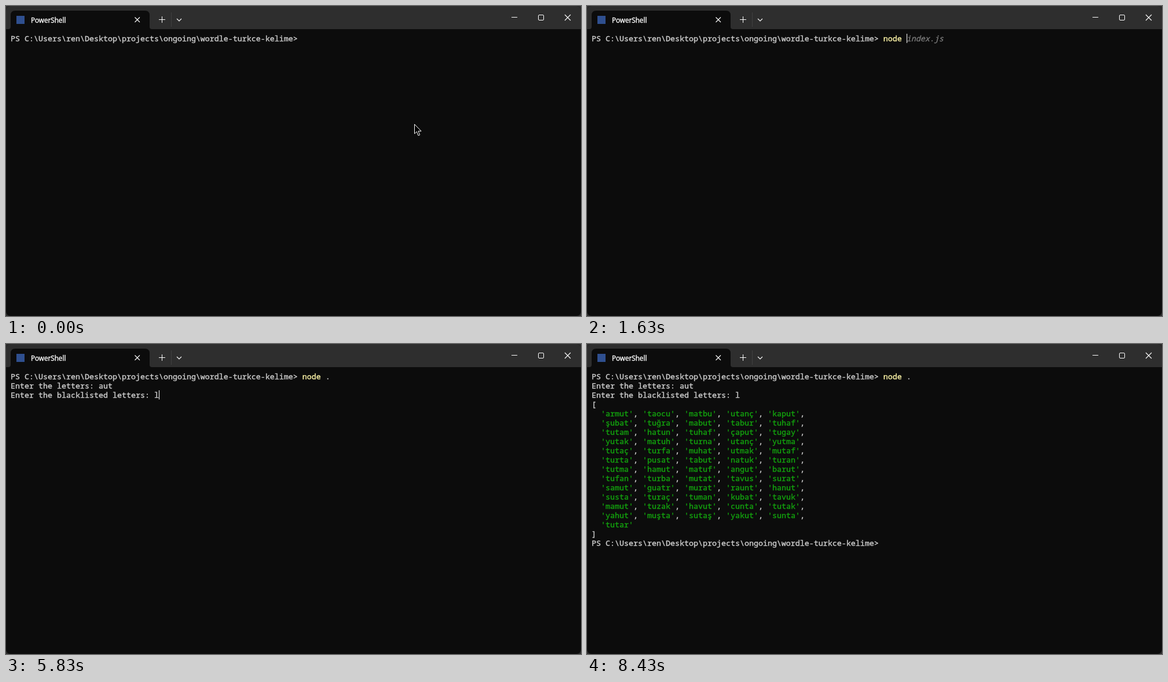
Recreate the animation shown at these times as an HTML page. Size 993 by 536 pixels, loop 8500 ms.

```html
<!DOCTYPE html>
<html lang="en">
<head>
<meta charset="utf-8">
<title>Terminal</title>
<style>
  html, body { margin: 0; width: 100%; height: 100%; overflow: hidden; background: #2b2b2b; }
  #win { position: absolute; left: 0; top: 0; width: 993px; height: 536px; overflow: hidden; border-radius: 8px; background: #0c0c0c; }
  svg { position: absolute; left: 0; top: 0; }
  #title, #term { -webkit-text-stroke: .4px currentColor; white-space: pre; }
  #title { position: absolute; left: 43px; top: 15px; font: 11.7px/18px "Open Sans", "Noto Sans", sans-serif; color: #fff; }
  #term { position: absolute; left: 8px; top: 48px; margin: 0; font: 13.3333px/16px "Noto Sans Mono", "DejaVu Sans Mono", monospace; font-variant-ligatures: none; color: #ccc; }
  .cmd { color: #f9f1a5; }
  .hint { color: #797979; font-style: italic; }
  .str { color: #13a10e; }
  #caret { position: absolute; left: 0; top: 0; width: 1px; height: 16px; background: #fff; }
</style>
</head>
<body>
<div id="win">
  <svg width="993" height="40" fill="none" stroke="#fff">
    <rect width="993" height="40" fill="#2e2e2e" stroke="none"/>
    <path d="M4 40Q8 40 8 36V16Q8 8 16 8H240Q248 8 248 16V36Q248 40 252 40Z" fill="#0c0c0c" stroke="none"/>
    <rect x="18" y="17" width="14" height="14" fill="#2f4f8f" stroke="none"/>
    <path d="M222.5 19.5l8.5 8.5m0-8.5l-8.5 8.5" stroke-width="1.1"/>
    <path d="M264 23.5h11M269.5 18v11"/>
    <path d="M285.5 11v25" stroke="#414141"/>
    <path d="M295 22l4 4 4-4" stroke-width="1.1"/>
    <path d="M873 19.5h10"/>
    <rect x="919.5" y="15.5" width="9" height="9" rx="1.5"/>
    <path d="M965 15l10 10m0-10l-10 10" stroke-width="1.1"/>
  </svg>
  <div id="title">PowerShell</div>
  <pre id="term"></pre>
  <div id="caret"></div>
  <svg id="mouse" width="14" height="22">
    <path d="M.5 .5V16.8L4.3 13.2 7 20 9.6 18.9 6.9 12.3H12Z" fill="#000" stroke="#fff" stroke-linejoin="round"/>
  </svg>
</div>
<script>
const LOOP = 8500, FRAME = 100 / 3;
const $ = id => document.getElementById(id);
const term = $('term'), caret = $('caret'), mouse = $('mouse');

const prompt = 'PS C:\\Users\\ren\\Desktop\\projects\\ongoing\\wordle-turkce-kelime> ';
const words = `armut taocu matbu utanç kaput şubat tuğra mabut tabur tuhaf
tutam hatun tuhaf çaput tugay yutak matuh turna utanç yutma
tutaç turfa muhat utmak mutaf turta pusat tabut natuk turan
tutma hamut matuf angut barut tufan turba mutat tavus surat
samut guatr murat raunt hanut susta turaç tuman kubat tavuk
mamut tuzak havut cunta tutak yahut muşta sutaş yakut sunta tutar`.split(/\s+/);

// key press times for each input
const command = { text: 'node .', at: [1330, 1400, 1470, 1570, 1630, 1700] };
const letters = { text: 'aut', at: [3270, 3430, 3570] };
const blocked = { text: 'l', at: [5830] };
const hint = 'node index.js';

const caretOn = [[600, 1130], [1330, 2400], [2930, 4800], [5330, 6700], [7230, 7765], [8300, 8430]];

// pointer tracks: time, x, y
const tracks = [
  { from: 0, to: 1330, keys: [[0, 705, 204], [100, 705, 204], [230, 702, 178], [360, 694, 108], [480, 687, 52], [600, 684, 28], [633, 686, 26], [730, 708, 66], [830, 727, 109]] },
  { from: 1930, to: 3270, keys: [[1930, 727, 109]] },
  { from: 7700, to: 7900, keys: [[7700, 728, 114], [7766, 744, 206], [7867, 787, 487]] }
];

const typed = (input, t) => input.text.slice(0, input.at.filter(a => t >= a).length);
const span = (cls, s) => `<span class="${cls}">${s}</span>`;

function listing() {
  const rows = ['['];
  for (let i = 0; i < words.length; i += 5) {
    const row = words.slice(i, i + 5).map(w => span('str', `'${w}'`)).join(', ');
    rows.push('  ' + row + (i + 5 < words.length ? ',' : ''));
  }
  return [...rows, ']'];
}

// returns the lines on screen and the caret cell
function screen(t) {
  const cmd = typed(command, t);
  let col = prompt.length + cmd.length;
  let first = prompt + span('cmd', cmd.slice(0, 4)) + cmd.slice(4);
  if (cmd && hint.startsWith(cmd)) first += span('hint', hint.slice(cmd.length));
  const lines = [first];
  const ask = (label, input) => {
    const s = label + typed(input, t);
    lines.push(s);
    col = s.length;
  };
  if (t >= 1830) { lines.push(''); col = 0; }
  if (t >= 1930) { lines.pop(); ask('Enter the letters: ', letters); }
  if (t >= 4200) ask('Enter the blacklisted letters: ', blocked);
  if (t >= 6070) { lines.push(''); col = 0; }
  if (t >= 6100) {
    lines.pop();
    lines.push(...listing(), prompt);
    col = prompt.length;
  }
  return { html: lines.join('\n'), col, row: lines.length - 1 };
}

function pointerAt(keys, t) {
  const i = keys.findIndex(k => k[0] > t);
  if (i < 0) return keys[keys.length - 1].slice(1);
  const a = keys[i - 1], b = keys[i], p = (t - a[0]) / (b[0] - a[0]);
  return [1, 2].map(n => Math.round(a[n] + (b[n] - a[n]) * p));
}

let shown;
function draw(t) {
  const s = screen(t);
  if (s.html !== shown) term.innerHTML = shown = s.html;
  caret.style.transform = `translate(${8 + s.col * 8}px, ${48 + s.row * 16}px)`;
  caret.style.visibility = caretOn.some(([a, b]) => t >= a && t < b) ? 'visible' : 'hidden';

  const track = tracks.find(k => t >= k.from && t < k.to);
  mouse.style.visibility = track ? 'visible' : 'hidden';
  if (track) {
    const step = Math.max(track.from, Math.floor((t + 3.4) / FRAME) * FRAME);
    const [x, y] = pointerAt(track.keys, step);
    mouse.style.transform = `translate(${x}px, ${y}px)`;
  }
}

const start = performance.now();
function tick() {
  draw((performance.now() - start) % LOOP);
  requestAnimationFrame(tick);
}
tick();
</script>
</body>
</html>
```
